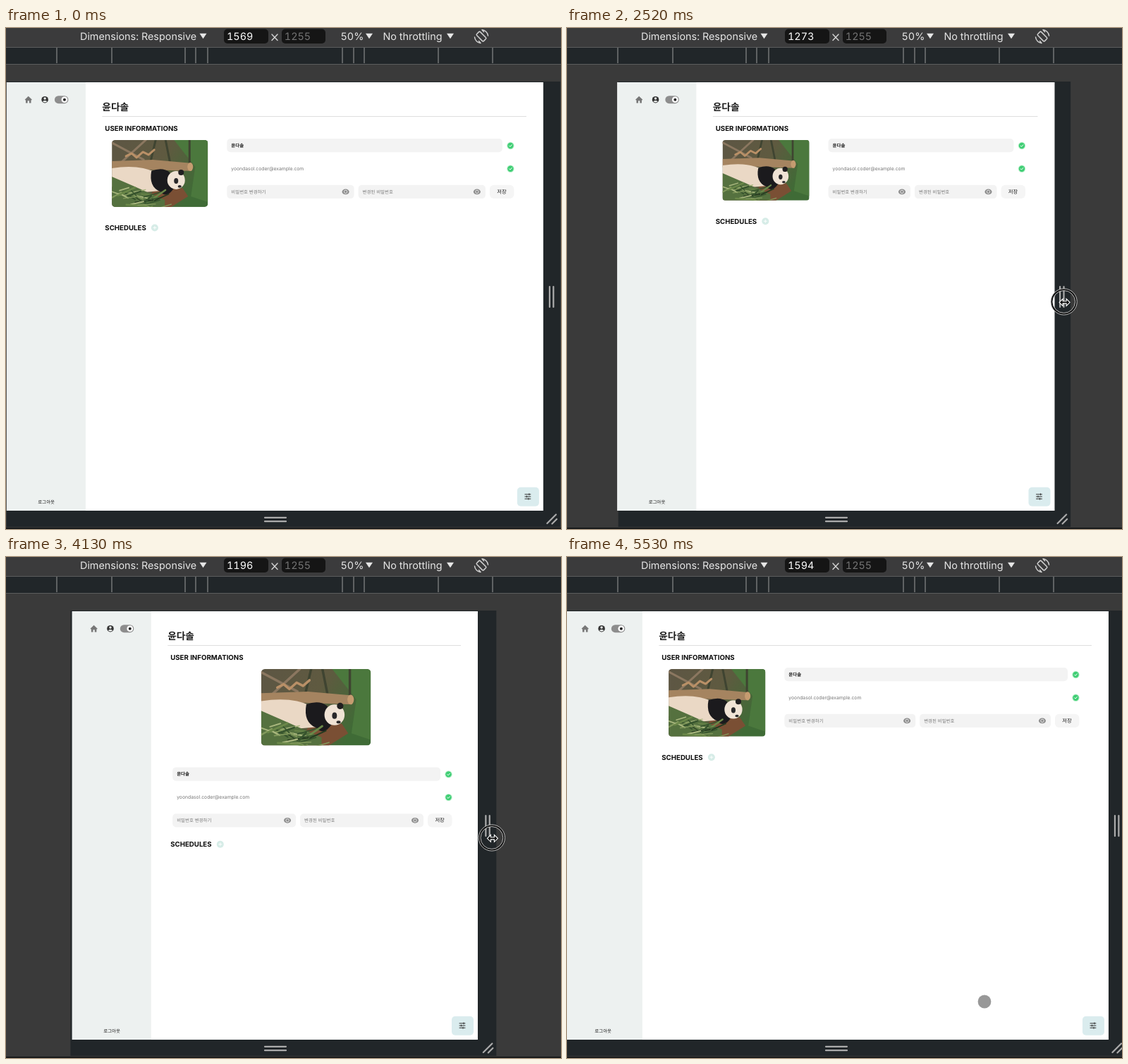
Write an HTML page that moves like this. It is 787 px wide and 711 px high and loops after 5.6 s.

```html
<!DOCTYPE html>
<html lang="ko">
<head>
<meta charset="utf-8">
<title>Responsive page</title>
<style>
  html, body { margin: 0; width: 100%; height: 100%; overflow: hidden; background: #3a3a3a; }
  svg { display: block; width: 787px; height: 711px; }
  text { font-family: Inter, "Noto Sans CJK KR", "Noto Sans CJK JP", sans-serif; font-size: 6.45px; fill: #1c1c1c; text-rendering: geometricPrecision; }
  .bar text { font-size: 14.4px; fill: #e6e6e6; font-variant-numeric: tabular-nums; }
  .mid { text-anchor: middle; }
  .bold { font-weight: 700; }
  .head { font-size: 9.7px; font-weight: 700; fill: #0c0c0c; }
  .hint { fill: #777; }
  .field { fill: #f3f3f3; }
  .line { fill: none; stroke-linecap: round; stroke-linejoin: round; }
</style>
</head>
<body>
<svg viewBox="0 0 787 711">
  <defs>
    <linearGradient id="wood" x2="1" y2=".4">
      <stop offset="0" stop-color="#5d5644"/>
      <stop offset=".55" stop-color="#5f5a40"/>
      <stop offset="1" stop-color="#3f6b36"/>
    </linearGradient>
    <clipPath id="round"><rect width="136" height="95" rx="4.5"/></clipPath>
    <g id="check">
      <circle r="5.2" fill="#b9efcb"/>
      <circle r="4.2" fill="#3fce74"/>
      <path class="line" d="M-1.8 .1L-.5 1.4L1.9-1.2" stroke="#fff"/>
    </g>
    <g id="eye">
      <ellipse rx="5" ry="3.9" fill="#8d8d8d"/>
      <circle r="2.2" fill="none" stroke="#eee" stroke-width=".9"/>
    </g>
    <path id="drop" d="M-5-3.6H5L0 4Z" fill="#e6e6e6"/>
  </defs>

  <rect width="787" height="711" fill="#3a3a3a"/>
  <g class="bar">
    <rect width="787" height="27" fill="#3b3b3c"/>
    <rect y="27" width="787" height="25" fill="#5c5d5e"/>
    <rect y="28" width="787" height="23" fill="#212629"/>
    <g id="ticks" fill="#5f6263"></g>
    <text x="105" y="17">Dimensions: Responsive</text>
    <use href="#drop" x="279.5" y="11.3"/>
    <rect x="309" y="1.5" width="63" height="20.5" rx="5" fill="#151515"/>
    <text id="count" class="mid" x="331.7" y="17" style="fill:#fff"></text>
    <path class="line" d="M377 9L385 17.5M385 9L377 17.5" stroke="#d5d5d5" stroke-width="1.4"/>
    <rect x="391" y="1.5" width="62" height="20.5" rx="5" fill="#151515"/>
    <text class="mid" x="413.5" y="17" style="fill:#747474">1255</text>
    <text x="474.5" y="17">50%</text>
    <use href="#drop" x="515" y="11.3"/>
    <text x="534.5" y="17">No throttling</text>
    <use href="#drop" x="630" y="11.3"/>
    <g class="line" stroke="#d0d0d0" stroke-width="1.5">
      <rect x="670.5" y="5" width="7" height="14" rx="1.5" transform="rotate(-45 674 12)"/>
      <path d="M664.5 13A9.7 9.7 0 0 0 673 21.5L670.5 18.5M683.5 11A9.7 9.7 0 0 0 675 2.5L677.5 5.5"/>
    </g>
  </g>

  <rect y="709" width="787" height="2" fill="#17191a"/>
  <rect id="frame" y="76" height="632" fill="#212629"/>
  <path class="line" d="M367 694.8H397M367 700.2H397" stroke="#ababab" stroke-width="2.2"/>
  <path id="grip" class="line" d="M9 367V396M14.4 367V396M5.5 703L18 690.5M12.5 703.5L19 697" stroke="#ababab" stroke-width="2.2"/>

  <rect id="page" y="77" height="608" fill="#fff"/>
  <g id="left">
    <rect y="77" width="112" height="608" fill="#edf1f0"/>
    <path d="M25.7 101.7L30.8 96.8L36 101.7L35 102.6L34.6 102.2V106.5H32V103.3H29.7V106.5H27.1V102.2L26.7 102.6Z" fill="#777"/>
    <circle cx="54.2" cy="101.7" r="4.8" fill="#333"/>
    <circle cx="54.2" cy="100" r="1.7" fill="#edf1f0"/>
    <path d="M51 104.2Q54.2 101.6 57.4 104.2Q54.2 107 51 104.2Z" fill="#edf1f0"/>
    <rect x="68" y="96.2" width="19.5" height="11" rx="5.5" fill="#8d8d8d"/>
    <circle cx="82" cy="101.7" r="4.4" fill="#fff"/>
    <circle cx="82" cy="101.7" r="2" fill="#222"/>
    <text class="mid" x="56.3" y="674.8">로그아웃</text>
    <text class="bold" x="135.4" y="117.2" style="font-size:13.7px">윤다솔</text>
    <text class="head" x="139.4" y="145.7">USER INFORMATIONS</text>
    <g id="plan">
      <text class="head" x="139.4" y="3.5">SCHEDULES</text>
      <circle cx="210" r="5" fill="#d6ece7"/>
      <path class="line" d="M208 0H212M210-2V2" stroke="#fff" stroke-width=".9"/>
    </g>
  </g>
  <rect id="rule" y="125" height="1" fill="#dedede"/>

  <g id="photo" clip-path="url(#round)">
    <rect width="136" height="95" fill="url(#wood)"/>
    <path d="M88 0H136V88L112 80L118 38Z" fill="#4b783d"/>
    <g class="line" stroke-width="3">
      <path d="M0 4L45 28M48 0L12 33" stroke="#8b7760"/>
      <path d="M76 0L82 30M62 0L55 30M110 0V32" stroke="#3f4431"/>
      <path d="M20 23L28 19L35 25L44 17L52 21L60 14" stroke="#b99067"/>
    </g>
    <path d="M0 30L58 28L113 33V44L52 42L0 43Z" fill="#a58460"/>
    <ellipse cx="111" cy="38" rx="4" ry="6" fill="#c59c70"/>
    <path d="M58 72L100 68L108 80L84 95H50Z" fill="#7a4f34"/>
    <path d="M0 40Q38 34 62 46L70 72L22 76L0 66Z" fill="#ead8c5"/>
    <path d="M56 44Q72 38 82 46L88 68Q78 84 68 73Q52 66 56 44Z" fill="#1b1a1d"/>
    <ellipse cx="91" cy="57" rx="12.5" ry="13" fill="#f0e3d5"/>
    <circle cx="98" cy="46" r="4" fill="#211f20"/>
    <ellipse cx="91" cy="58" rx="3" ry="4" fill="#29282a"/>
    <ellipse cx="96" cy="66" rx="2.6" ry="1.8" fill="#29282a"/>
    <path d="M0 52L30 65L75 85V95H0Z" fill="#55713f"/>
    <g id="leaves" class="line"></g>
  </g>

  <g id="form">
    <rect id="name" class="field" y="157" height="19.3" rx="5"/>
    <text class="bold" x="6" y="168.9">윤다솔</text>
    <text class="hint" x="6" y="202" style="font-size:6.79px">yoondasol.coder@example.com</text>
    <rect id="old" class="field" y="222.8" height="19.3" rx="5"/>
    <text class="hint" x="6" y="234.8">비밀번호 변경하기</text>
    <use id="eye1" href="#eye" y="232.4"/>
    <g id="fresh">
      <rect id="new" class="field" y="222.8" height="19.3" rx="5"/>
      <text class="hint" x="6" y="234.8">변경된 비밀번호</text>
      <use id="eye2" href="#eye" y="232.4"/>
    </g>
  </g>
  <g id="ends">
    <use href="#check" x="-46.5" y="167"/>
    <use href="#check" x="-46.5" y="199.7"/>
    <rect x="-76" y="222.8" width="34.5" height="19.3" rx="6" fill="#f5f5f5"/>
    <text class="mid" x="-58.9" y="235.1" style="font-size:7.3px;font-weight:500">저장</text>
  </g>
  <g id="tool">
    <rect x="-37" y="651.8" width="31" height="27" rx="5" fill="#daecee"/>
    <path class="line" d="M-26 661.8H-18M-26 665H-18M-26 668.2H-18M-20 660.8V662.8M-23.5 664V666M-21 667.2V669.2" stroke="#333" stroke-width="1"/>
  </g>

  <g id="ring">
    <circle r="17.2" fill="none" stroke="#111" stroke-width="2.8"/>
    <circle r="18.6" fill="none" stroke="#ddd" stroke-width=".8"/>
    <circle r="15.9" fill="none" stroke="#ddd" stroke-width=".8"/>
    <path d="M-6.5 .8L-1.5-4.2V-.8H3.5V-4.2L8.5 .8L3.5 5.8V2.4H-1.5V5.8Z" fill="#111" stroke="#fff" stroke-width="1.1"/>
  </g>
  <circle id="dot" r="9.4" fill="#989898"/>
</svg>

<script>
const LOOP = 5600, STEP = 70, SCALE = 0.485, MID = 381.4, BREAK = 1200;
const $ = id => document.getElementById(id);
const set = (id, name, value) => $(id).setAttribute(name, value);
const move = (id, x, y = 0) => set(id, 'transform', `translate(${x} ${y})`);
const show = (id, on) => set(id, 'visibility', on ? 'visible' : 'hidden');

// Monotone cubic through [time, value] pairs, clamped at both ends
function curve(keys) {
  const rate = i => (keys[i + 1][1] - keys[i][1]) / (keys[i + 1][0] - keys[i][0]);
  const last = keys.length - 1;
  const slope = keys.map((_, i) => {
    if (i === 0 || i === last) return 0;
    const a = rate(i - 1), b = rate(i);
    return a * b > 0 ? 2 * a * b / (a + b) : 0;
  });
  return t => {
    if (t <= keys[0][0]) return keys[0][1];
    if (t >= keys[last][0]) return keys[last][1];
    const i = keys.findIndex(k => k[0] > t) - 1;
    const [t0, a] = keys[i], [t1, b] = keys[i + 1];
    const d = t1 - t0, u = (t - t0) / d, s = u * u * (3 - 2 * u);
    return a + (b - a) * s + d * u * (1 - u) * (slope[i] * (1 - u) - slope[i + 1] * u);
  };
}

const width = curve([[1960, 1569], [2520, 1273], [2940, 1106], [3150, 988], [3570, 966],
  [3710, 966], [4340, 1343], [4480, 1410], [4970, 1560], [5250, 1594]]);
const ringGap = curve([[1400, 44], [1470, 38], [1750, 15.5], [1960, 13.5], [2520, 14.5],
  [2940, 14], [3570, 16], [4480, 18], [5250, 17]]);
const ringY = curve([[1470, 392], [1750, 382], [1960, 382], [2520, 388.5], [2940, 400.5],
  [3570, 407], [3710, 407], [4480, 392], [5250, 406]]);
const dotX = curve([[70, 60], [280, 180], [490, 480], [630, 750], [770, 785], [910, 805],
  [5390, 785], [5460, 690], [5530, 592]]);
const dotY = curve([[70, 703], [280, 400], [490, 150], [560, 112], [630, 140], [700, 172], [910, 200],
  [5390, 406], [5460, 520], [5530, 631]]);

function layout(now, seen) {
  const half = now * SCALE / 2, edge = MID + half;
  set('frame', 'x', MID - half);
  set('frame', 'width', half * 2 + 24);
  move('grip', edge);

  // The page repaints slightly after its frame
  const w = seen * SCALE, L = MID - w / 2, R = MID + w / 2;
  const wide = seen >= BREAK;
  const dx = wide ? 0 : 5, dy = wide ? 0 : 141.4;
  const pic = wide ? 123 + 0.0935 * (w - 620) : 155.5;
  const picH = pic / 1.433;
  const x = wide ? L + 176.2 + pic : L + 142.4;
  const end = R - 82 + dx, fieldW = (end - x - 6) / 2;

  set('page', 'x', L);
  set('page', 'width', w);
  move('left', L);
  move('tool', R);
  set('rule', 'x', L + 135.5);
  set('rule', 'width', w - 159.5);
  set('photo', 'transform',
    `translate(${wide ? L + 149.2 : 361.8} 158.9) scale(${pic / 136} ${picH / 95})`);
  move('plan', 0, wide ? 188.4 + picH : 407.7);
  move('form', x, dy);
  move('ends', R + dx, dy);
  set('name', 'width', R - 58 + dx - x);
  set('old', 'width', fieldW);
  set('new', 'width', fieldW);
  move('fresh', fieldW + 6);
  set('eye1', 'x', fieldW - 12);
  set('eye2', 'x', fieldW - 12);
  return edge;
}

function draw(t) {
  const now = width(t);
  const edge = layout(now, width(t - 12));
  $('count').textContent = Math.round(now);
  move('ring', edge + ringGap(t), ringY(t));
  show('ring', t >= 1470 && t < 5460);
  move('dot', dotX(t), dotY(t));
  show('dot', (t >= 70 && t <= 910) || t >= 5460);
}

$('ticks').innerHTML = [72, 150, 254, 269, 286, 477, 493, 508, 613, 690]
  .map(x => `<rect x="${x - 1}" y="28" width="2" height="22"/>`).join('');

let seed = 7;
const rand = () => (seed = seed * 16807 % 2147483647) / 2147483647;
const greens = ['#82995c', '#a9b77e', '#36532d', '#6b8849', '#25391f'];
$('leaves').innerHTML = Array.from({ length: 36 }, (_, i) => {
  const x = rand() * 66, y = 56 + x * 0.4 + rand() * 28;
  return `<path d="M${x} ${y}l${8 + rand() * 18} ${rand() * 22 - 12}" stroke="${greens[i % 5]}" stroke-width="${1 + rand() * 1.6}"/>`;
}).join('');

const start = performance.now();
function tick() {
  const t = (performance.now() - start) % LOOP;
  draw(Math.floor(t / STEP) * STEP);
  requestAnimationFrame(tick);
}
tick();
</script>
</body>
</html>
```
